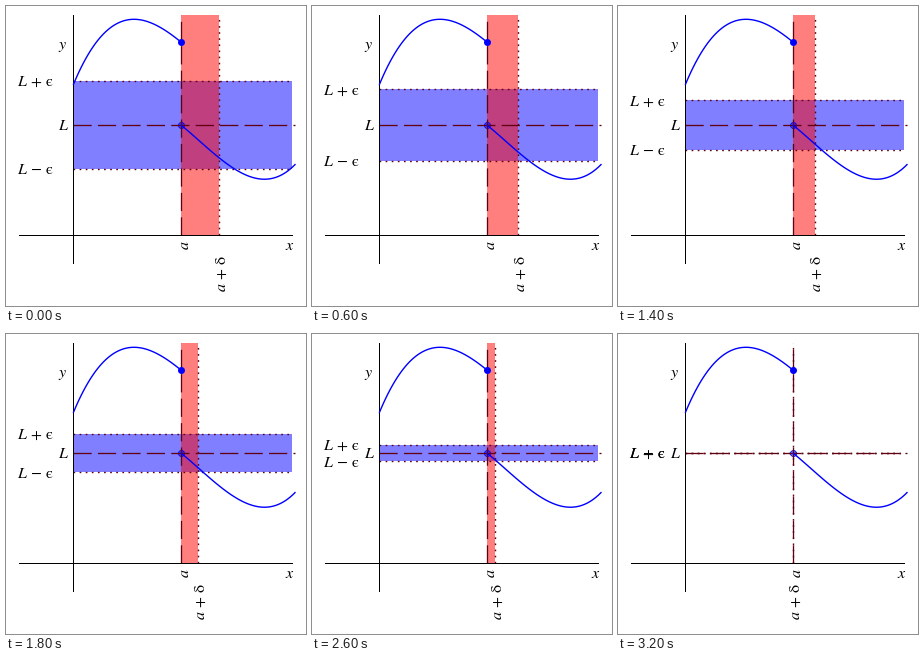
These frames come from a looping animation (300 by 300 pixels, 3.4 s). A matplotlib script:

```python
import numpy as np
import matplotlib.pyplot as plt
from matplotlib.animation import FuncAnimation
from matplotlib.patches import Rectangle

SIZE, DPI, STEPS = 300, 100, 17
PX = 72 / DPI
LEFT, RIGHT, TOP, BASE = 67.1, 286, 9, 229.1
A, LIMIT = 175.4, 119.1
EPS, JUMP = 44, 83
MAROON = "#600010"

plt.rcParams["mathtext.fontset"] = "stix"
plt.rcParams["lines.scale_dashes"] = False
fig = plt.figure(figsize=(SIZE / DPI, SIZE / DPI), dpi=DPI, facecolor="white")
ax = fig.add_axes([0, 0, 1, 1])
ax.set_xlim(0, SIZE)
ax.set_ylim(SIZE, 0)
ax.axis("off")


def curve(x):
    u = x - 128
    return 13.3 + 0.01356 * u**2 - 6.93e-5 * u**3


def line(x, y, color, width, z, **style):
    return ax.plot(x, y, color=color, lw=width * PX, zorder=z, **style)[0]


def pattern(on, off):
    return {"dashes": (on * PX, off * PX), "dash_capstyle": "butt"}


def label(x, y, text, **style):
    style = {"ha": "center", "va": "center", "fontsize": 16 * PX, "zorder": 6} | style
    return ax.text(x, y, text, **style)


def band(color, z):
    return ax.add_patch(Rectangle((0, 0), 0, 0, fc=color, alpha=0.5, lw=0, zorder=z))


blue_band, red_band = band("blue", 1), band("red", 2)

dashes, dots = pattern(18.2, 6.24), pattern(1.7, 4.41)
line([LEFT, 289], [LIMIT, LIMIT], MAROON, 1.3, 4, **dashes)
line([A, A], [BASE, TOP], MAROON, 1.3, 4, **dashes)
upper, lower, side = (line([], [], MAROON, 1.4, 3, **dots) for _ in range(3))

line([13, RIGHT], [BASE, BASE], "black", 1, 5)
line([LEFT, LEFT], [TOP, 257], "black", 1, 5)

for start, stop, shift in ((LEFT + 0.4, A, 0), (A, 289, JUMP)):
    x = np.linspace(start, stop, 120)
    line(x, curve(x) + shift, "blue", 1.4, 5)
ax.plot(A, 36, "o", color="blue", ms=7 * PX, mew=0, zorder=6)
ax.plot(A, LIMIT, "o", mfc=(0, 0, 1, 0.5), mec="blue", ms=6 * PX, mew=0.8 * PX, zorder=3.5)

label(57, 40, "$y$")
label(284, 240, "$x$")
label(57.5, 119.5, "$L$")
label(178.2, 239.5, "$a$", rotation=90)
plus = label(48, 0, r"$L\,+\,\mathrm{ϵ}$", ha="right")
minus = label(48, 0, r"$L\,-\,\mathrm{ϵ}$", ha="right")
reach = label(0, 268, r"$a\,+\,\mathrm{\delta}$", rotation=90)

reach_x = np.linspace(A, 240, 400)
reach_drop = curve(reach_x) - curve(A)


def update(i):
    eps = EPS * (1 - i / (STEPS - 1))
    # The right edge is where the curve has dropped a fixed share of eps.
    edge = np.interp(0.74 * eps, reach_drop, reach_x)
    high, low = LIMIT - eps, LIMIT + eps
    blue_band.set_bounds(LEFT, high, RIGHT - LEFT, 2 * eps)
    red_band.set_bounds(A, TOP, edge - A, BASE - TOP)
    upper.set_data([LEFT, RIGHT], [high, high])
    lower.set_data([LEFT, RIGHT], [low, low])
    side.set_data([edge, edge], [BASE, TOP])
    plus.set_y(high + 0.8)
    minus.set_y(low + 0.8)
    reach.set_x(edge + 2.4)
    return blue_band, red_band, upper, lower, side, plus, minus, reach


anim = FuncAnimation(fig, update, frames=STEPS, interval=200, repeat=True, blit=False)
plt.show()
```
